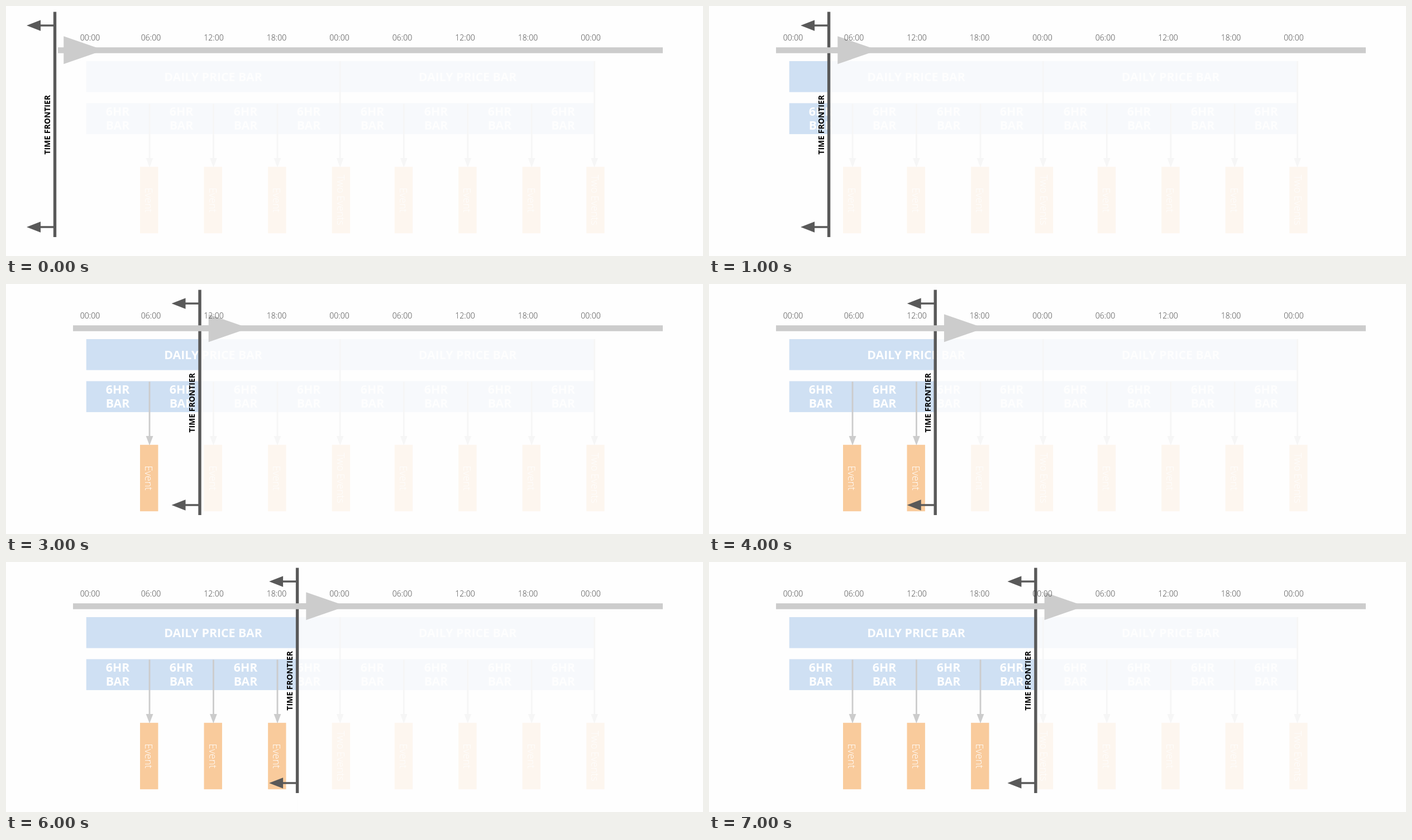
Animation, 1248 px wide and 449 px high, one loop 8000 ms. Source, as an HTML page:

```html
<!DOCTYPE html>
<html lang="en">
<head>
<meta charset="utf-8">
<title>Time frontier</title>
<style>
  html, body { margin: 0; width: 100%; height: 100%; overflow: hidden; background: #fefefe; }
  svg { display: block; width: 1248px; height: 449px; font-family: "Open Sans", sans-serif; }
  text { text-anchor: middle; }
  .bar { font-size: 21.3px; font-weight: 700; fill: #fff; }
  .event { font-size: 18px; font-weight: 300; fill: #fff; }
  .hour { font-size: 14px; font-weight: 300; fill: #434343; }
  .label { font-size: 14px; font-weight: 700; fill: #000; }
</style>
</head>
<body>
<svg viewBox="0 0 1248 449">
  <g id="chart"></g>
  <rect id="veil" y="90" width="1248" height="359" fill="#fefefe" fill-opacity=".85"/>
  <g id="frontier">
    <path d="M-2.7 10.5h5.4v404.5h-5.4z" fill="#595959"/>
    <path id="back" d="M0 33.2h-25.5v-8l-25 9.8 25 9.8v-8h25.5z" fill="#595959"/>
    <use href="#back" y="362"/>
    <text class="label" transform="translate(-8.6 213.3) rotate(-90)">TIME FRONTIER</text>
    <path d="M5.5 74.3h10.2v-20l72 25-72 25v-19.6h-10.2z" fill="#ccc"/>
  </g>
  <path d="M120 74.3h1056v10.4h-1056z" fill="#ccc"/>
  <g id="hours"></g>
</svg>
<script>
const $ = id => document.getElementById(id);
const rect = (x, y, w, h, fill) =>
  `<rect x="${x}" y="${y}" width="${w}" height="${h}" fill="${fill}"/>`;
const text = (cls, x, y, str) => `<text class="${cls}" x="${x}" y="${y}">${str}</text>`;

const barLeft = 143.7, barWidth = 909.8;
const arrowXs = [257, 371.4, 486, 598.2, 712.3, 826.8, 941.2, 1053.6];
const boxXs = [240, 354.5, 469.1, 583.7, 695.8, 810.2, 924.6, 1039.2];
const sixHourXs = [200, 314, 429, 542, 656, 770, 884, 997.5];

let chart = [99, 174.5].map(y => rect(barLeft, y, barWidth, 55.6, '#cfe0f3')).join('');
chart += text('bar', 371, 134.7, 'DAILY PRICE BAR') + text('bar', 826.5, 134.7, 'DAILY PRICE BAR');
arrowXs.forEach((x, i) => {
  const daily = i % 4 === 3, top = daily ? 99 : 175.5;
  chart += text('bar', sixHourXs[i], 197.4, '6HR') + text('bar', sixHourXs[i], 222.4, 'BAR')
    + rect(boxXs[i], 288.8, 32.4, 119.4, '#f9cb9c')
    + `<path d="M${x - 1.4} ${top}h2.8V273h5L${x} 290l-6.4-17h5z" fill="#ccc"/>`
    + `<text class="event" transform="translate(${boxXs[i] + 9.2} 348.5) rotate(90)">`
    + `${daily ? 'Two Events' : 'Event'}</text>`;
});
$('chart').innerHTML = chart;

const hourNames = ['00:00', '06:00', '12:00', '18:00'];
$('hours').innerHTML = Array.from({ length: 9 }, (_, i) =>
  text('hour', i ? 147 + 112.5 * i : 150.5, 62, hourNames[i % 4])).join('');

// The frontier jumps once a second.
const stops = [87.5, 214.6, 288.8, 347, 405.2, 463.4, 521.6, 584.9];
const start = performance.now();
function draw() {
  const x = stops[Math.floor((performance.now() - start) / 1000) % stops.length];
  $('frontier').setAttribute('transform', `translate(${x})`);
  $('veil').setAttribute('x', x);
  requestAnimationFrame(draw);
}
draw();
</script>
</body>
</html>
```
